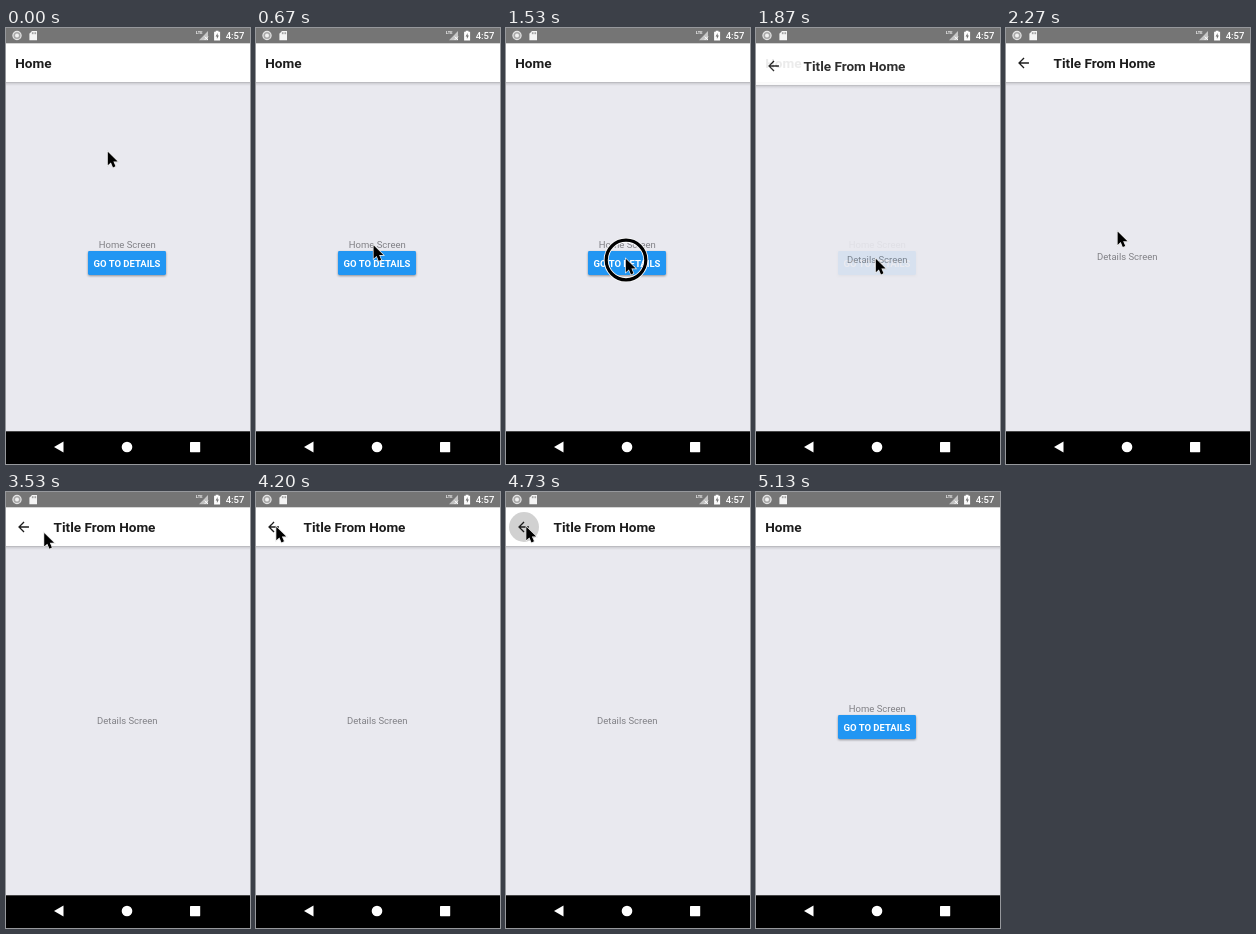
An HTML page for the animation above (5.79 s loop, 244 px wide and 436 px high).

```html
<!DOCTYPE html>
<html lang="en">
<head>
<meta charset="utf-8">
<title>Passing a title between screens</title>
<style>
  html, body { margin: 0; width: 100%; height: 100%; overflow: hidden; background: #000; }
  svg { display: block; width: 244px; height: 436px; }
  text { font-family: Roboto, "Noto Sans", sans-serif; }
  .title { font-size: 13.55px; font-weight: 700; fill: #1c1c1c; }
  .label { font-size: 9.5px; fill: #818186; text-anchor: middle; }
  .button { font-size: 9.5px; font-weight: 700; fill: #fff; text-anchor: middle; }
  .button-box { fill: #2196f3; filter: drop-shadow(0 1.2px 1.2px rgba(0, 0, 0, .38)); }
  .clock { font-size: 9.5px; font-weight: 500; fill: #fff; text-anchor: end; }
  .net { font-size: 4px; font-weight: 700; fill: #fff; }
  .pointer { filter: drop-shadow(0 .6px .6px rgba(0, 0, 0, .3)); }
</style>
</head>
<body>
<svg viewBox="0 0 244 436">
  <defs>
    <linearGradient id="shade" x2="0" y2="1">
      <stop stop-color="#000" stop-opacity=".24"/>
      <stop offset=".4" stop-color="#000" stop-opacity=".09"/>
      <stop offset="1" stop-color="#000" stop-opacity="0"/>
    </linearGradient>
    <g id="page">
      <rect y="15" width="244" height="389" fill="#e9e9ef"/>
      <rect y="15" width="244" height="39" fill="#fff"/>
      <rect y="54" width="244" height="4" fill="url(#shade)"/>
    </g>
  </defs>

  <g id="home">
    <use href="#page"/>
    <text class="title" x="9.2" y="40.2">Home</text>
    <text class="label" x="121.3" y="220.3">Home Screen</text>
    <rect class="button-box" x="82" y="223" width="78" height="24" rx="1.4"/>
    <text class="button" x="121" y="238.6">GO TO DETAILS</text>
  </g>

  <g id="details">
    <use href="#page"/>
    <circle id="ripple" cx="18" cy="35" r="15" fill="#000" fill-opacity=".18"/>
    <path transform="translate(9.4 26.9) scale(.678)" fill="#1c1c1c"
      d="M20 11H7.83l5.59-5.59L12 4l-8 8 8 8 1.41-1.41L7.83 13H20z"/>
    <text class="title" x="47.6" y="40.2">Title From Home</text>
    <text class="label" x="121.3" y="232.3">Details Screen</text>
  </g>

  <!-- status bar -->
  <rect width="244" height="15.3" fill="#757575"/>
  <circle cx="11" cy="7.5" r="4.1" fill="#a8a8a8" stroke="#e4e4e4" stroke-width="1.2"/>
  <circle cx="11" cy="7.5" r="2" fill="#f0f0f0"/>
  <path d="M26 3h5v9.3h-7.6V5.7z" fill="#f4f4f4"/>
  <path d="M26.4 4.2v2M28 4.2v2M29.6 4.2v2" stroke="#757575" stroke-width=".7"/>
  <text class="net" x="190" y="6">LTE</text>
  <path d="M202 3v9.2h-9z" fill="#c4c4c4"/>
  <path d="M198.6 8.6l3.4 3.4m0-3.4l-3.4 3.4" stroke="#fff" stroke-width=".9"/>
  <path d="M209.7 2.7h2.8v1h1.6v8.7h-6V3.700h1.6z" fill="#fff"/>
  <path d="M211.600 5l-2 3.500h1.300v2.500l2-3.500h-1.300z" fill="#757575"/>
  <text class="clock" x="238.400" y="11">4:57</text>

  <!-- navigation bar -->
  <rect y="403.3" width="244" height="33" fill="#000"/>
  <g fill="#fff">
    <path d="M48 419l9.500-5.600v11.200z"/>
    <circle cx="121" cy="419" r="5.300"/>
    <rect x="184" y="414" width="10.200" height="10.200" rx=".6"/>
  </g>

  <g id="ring" fill="none">
    <circle r="19.800" stroke="#fff" stroke-width="5"/>
    <circle r="19.800" stroke="#000" stroke-width="3.200"/>
  </g>
  <g id="pointer" class="pointer">
    <path d="M.8.8V14.300l3.100-2.900 2.100 5 2.500-1.100-2.100-4.800h4.300z"
      fill="#000" stroke="#fff" stroke-width="1.300" paint-order="stroke"/>
  </g>
</svg>

<script>
const LOOP = 5790, SLIDE = 34;
const [details, ripple, ring, pointer] =
  ['details', 'ripple', 'ring', 'pointer'].map(id => document.getElementById(id));

const clamp = x => Math.min(1, Math.max(0, x));
const smooth = x => x * x * (3 - 2 * x);
const soften = x => 1 - (1 - x) ** 1.4;
const show = (el, on) => el.setAttribute('visibility', on ? 'visible' : 'hidden');
const place = (el, x, y) => el.setAttribute('transform', `translate(${x} ${y})`);

// Pointer moves, in ticks: from, to, end point, easing
const start = [101, 123];
const moves = [
  [3, 12, [119, 230], smooth],
  [33, 42, [65, 50], soften],
  [49, 56, [19.5, 34], smooth]
];

function pointerAt(tick) {
  let [x, y] = start;
  for (const [from, to, end, ease] of moves) {
    const k = ease(clamp((tick - from) / (to - from)));
    x += (end[0] - x) * k;
    y += (end[1] - y) * k;
  }
  return [x, y];
}

// How far the details card has opened, 0 to 1
function openness(ms) {
  const opening = 1 - (1 - clamp((ms - 1735) / 350)) ** 5;
  const closing = clamp((ms - 4700) / 230) ** 4;
  return opening * (1 - closing);
}

function draw(ms) {
  const tick = Math.floor((Math.floor(ms / 10) + .5) * .15);
  const now = Math.round(tick * 20 / 3) * 10;

  const [x, y] = pointerAt(tick);
  place(pointer, x, y);
  show(pointer, tick < 74);
  place(ring, x + 1, y + 2);
  show(ring, tick === 23 || tick === 24 || tick === 64 || tick === 65);

  const open = openness(now);
  place(details, 0, SLIDE * (1 - open));
  details.setAttribute('opacity', open);

  const press = clamp((tick - 65) / 5);
  ripple.setAttribute('r', 15 * (1 - (1 - press) ** 2));
}

const begin = performance.now();
function loop() {
  draw((performance.now() - begin) % LOOP);
  requestAnimationFrame(loop);
}
loop();
</script>
</body>
</html>
```
